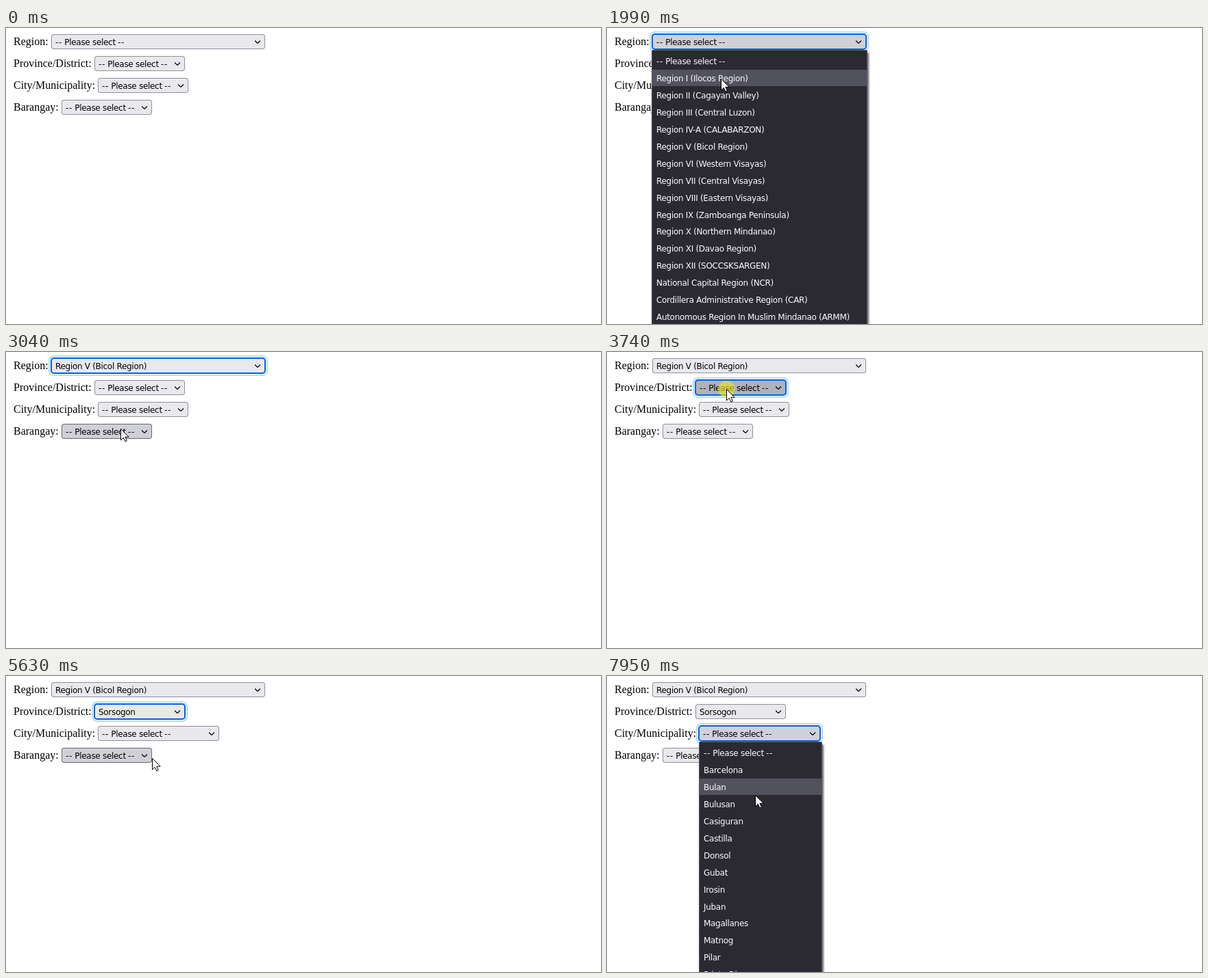
Write an HTML page with a canvas that moves like this. It is 868 px wide and 433 px high and loops after 8 s.

```html
<!DOCTYPE html>
<html lang="en">
<head>
<meta charset="utf-8">
<title>Address selects</title>
<style>
  html, body { margin: 0; width: 100%; height: 100%; overflow: hidden; background: #fff; }
  canvas { display: block; }
</style>
</head>
<body>
<canvas id="stage" width="868" height="433"></canvas>
<script>
const ctx = document.getElementById('stage').getContext('2d');
const LOOP = 8000, STEP = 70, ROW = 24.945;
const PLEASE = '-- Please select --';
const CHEVRON = new Path2D('M-4 -.6L-.6 2.8H.6L4 -.6V-2.3L0 1.5L-4 -2.3Z');
const ARROW = new Path2D('M0 0V16.5L3.8 12.8L6.3 18.4L8.8 17.3L6.4 11.8H11.6Z');

const regions = [PLEASE, 'Region I (Ilocos Region)', 'Region II (Cagayan Valley)',
  'Region III (Central Luzon)', 'Region IV-A (CALABARZON)', 'Region V (Bicol Region)',
  'Region VI (Western Visayas)', 'Region VII (Central Visayas)', 'Region VIII (Eastern Visayas)',
  'Region IX (Zamboanga Peninsula)', 'Region X (Northern Mindanao)', 'Region XI (Davao Region)',
  'Region XII (SOCCSKSARGEN)', 'National Capital Region (NCR)',
  'Cordillera Administrative Region (CAR)', 'Autonomous Region In Muslim Mindanao (ARMM)', ''];
const provinces = [PLEASE, 'Albay', 'Camarines Norte', 'Camarines Sur', 'Catanduanes', 'Masbate', 'Sorsogon'];
const cities = [PLEASE, 'Barcelona', 'Bulan', 'Bulusan', 'Casiguran', 'Castilla', 'Donsol', 'Gubat',
  'Irosin', 'Juban', 'Magallanes', 'Matnog', 'Pilar', 'Prieto Diaz', ''];

// focus, open: [from, to) in ms; menu: [left, right]
const fields = [
  { label: 'Region:', x: 66, y: 9, w: 312, items: regions, pick: 5,
    focus: [1590, 3740], open: [1590, 2780], menu: [65, 380] },
  { label: 'Province/District:', x: 129, y: 41, w: 132, items: provinces, pick: 6,
    focus: [3740, 5970], open: [3810, 5220], menu: [128, 263] },
  { label: 'City/Municipality:', x: 134, y: 73, w: 132, wide: 177, items: cities, pick: 0,
    focus: [5970, LOOP], open: [6040, LOOP], menu: [134, 314] },
  { label: 'Barangay:', x: 81, y: 105, w: 132, items: [PLEASE], pick: 0,
    focus: [LOOP, LOOP], open: [LOOP, LOOP] },
];

// start, end, from x, y, to x, y, ease-out power
const moves = [
  [310, 520, 722, 378, 170, 16, 1.5],
  [1850, 2390, 170, 16, 159, 175, 1.5],
  [2780, 3320, 159, 175, 174, 54, 1.5],
  [4200, 5020, 174, 54, 180, 232, 1.5],
  [5210, 5900, 180, 232, 225, 82, 1.45],
  [6710, 7540, 225, 82, 226, 145, 2],
  [7600, 7950, 226, 145, 216, 174, 1.5],
];
const clicks = [1520, 2650, 3740, 5150, 5970];

const within = (t, [from, to]) => t >= from && t < to;

function cursorAt(t) {
  const move = moves.filter(m => t >= m[0]).pop();
  if (!move) return null;
  const [start, end, x0, y0, x1, y1, power] = move;
  const u = t >= end ? 1 : Math.floor((t - start) / STEP) * STEP / (end - start);
  const p = 1 - (1 - u) ** power;
  return { x: Math.round(x0 + (x1 - x0) * p), y: Math.round(y0 + (y1 - y0) * p) };
}

function box(x, y, w, h, r, color) {
  ctx.fillStyle = color;
  ctx.beginPath();
  ctx.roundRect(x, y, w, h, r);
  ctx.fill();
}

function text(str, x, y, color) {
  ctx.font = '12px "DejaVu Sans", sans-serif';
  ctx.fillStyle = color;
  ctx.letterSpacing = '-0.3px';
  if (str === PLEASE) {
    ctx.fillText('Please select', x + 13.3, y);
    ctx.letterSpacing = '0.6px';
    ctx.fillText('--', x, y);
    ctx.fillText('--', x + 91, y);
  } else {
    ctx.fillText(str, x, y);
  }
  ctx.letterSpacing = '0px';
}

function drawField(f, t, cursor, anyOpen) {
  const { x, y } = f, h = 22;
  const w = f.wide && t >= 5220 ? f.wide : f.w;
  const open = within(t, f.open), focused = within(t, f.focus);
  const hover = open || (!anyOpen && cursor && cursor.x >= x && cursor.x <= x + w &&
    cursor.y >= y && cursor.y <= y + h);
  const pressed = focused && hover && !open && t - f.focus[0] < STEP;

  ctx.font = '16px "Liberation Serif", serif';
  ctx.fillStyle = '#000';
  ctx.fillText(f.label, 11, y + 16);

  const fill = pressed ? '#b1b1b9' : hover ? '#d0d0d7' : '#e9e9ed';
  const outset = (d, color) => box(x - d, y - d, w + 2 * d, h + 2 * d, 4 + d, color);
  if (focused) {
    outset(4, '#b3ddf9');
    outset(2, '#fff');
    outset(1, '#0060df');
  } else {
    outset(0, hover ? '#676774' : '#8f8f9d');
  }
  outset(-1, fill);
  text(f.items[t >= f.open[1] ? f.pick : 0], x + 6, y + 16, '#000');

  ctx.save();
  ctx.translate(x + w - 11, y + 11);
  ctx.fillStyle = '#000';
  ctx.fill(CHEVRON);
  ctx.restore();
}

function drawMenu(f, cursor) {
  const [left, right] = f.menu, top = f.y + 23, first = top + 4;
  const width = right - left, height = f.items.length * ROW + 8;
  ctx.shadowColor = 'rgba(0,0,0,.6)';
  ctx.shadowBlur = 3;
  ctx.shadowOffsetX = 2;
  ctx.shadowOffsetY = 4;
  box(left, top, width, height, 2, '#5b5b66');
  ctx.shadowColor = 'transparent';
  box(left + 1, top + 1, width - 2, height - 2, 1, '#2b2a33');

  const active = Math.max(0, Math.floor((cursor.y - first) / ROW));
  f.items.forEach((item, i) => {
    const y = Math.round(first + i * ROW);
    if (i === active) {
      ctx.fillStyle = '#52525e';
      ctx.fillRect(left + 1, y, width - 2, 24);
    }
    text(item, left + 7, y + 17, '#fbfbfe');
  });
}

function drawCursor({ x, y }, clicking) {
  if (clicking) {
    ctx.fillStyle = 'rgba(240,230,30,.62)';
    ctx.beginPath();
    ctx.arc(x, y, 12, 0, 7);
    ctx.fill();
  }
  ctx.save();
  ctx.translate(x + .5, y + .5);
  ctx.fillStyle = '#fff';
  ctx.strokeStyle = '#000';
  ctx.fill(ARROW);
  ctx.stroke(ARROW);
  ctx.restore();
}

function draw(now) {
  const t = now % LOOP;
  const cursor = cursorAt(t);
  const opened = fields.find(f => within(t, f.open));
  ctx.fillStyle = '#fff';
  ctx.fillRect(0, 0, 868, 433);
  fields.forEach(f => drawField(f, t, cursor, opened));
  if (opened) drawMenu(opened, cursor);
  if (cursor) drawCursor(cursor, clicks.some(c => within(t, [c, c + 130])));
  requestAnimationFrame(draw);
}
requestAnimationFrame(draw);
</script>
</body>
</html>
```
